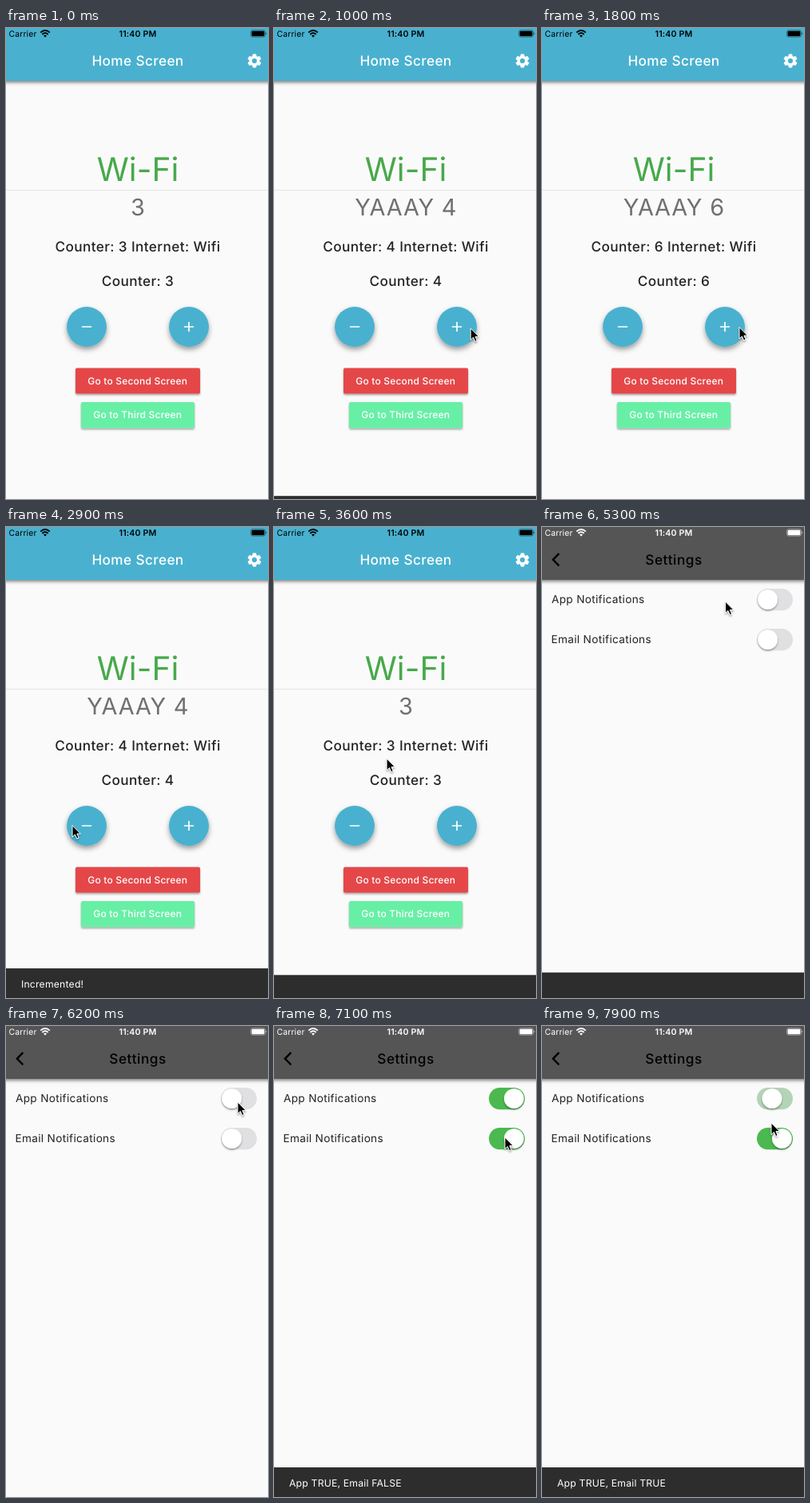
Write an HTML page that moves like this. It is 328 px wide and 588 px high and loops after 8 s.

```html
<!DOCTYPE html>
<html lang="en">
<head>
<meta charset="utf-8">
<title>Counter app</title>
<style>
  html, body { margin: 0; width: 100%; height: 100%; overflow: hidden; background: #fafafa; }
  svg { display: block; width: 100vw; height: 100vh; }
  text { font-family: Inter, Roboto, sans-serif; text-rendering: geometricPrecision; }
  .mid { text-anchor: middle; }
  .title { font-size: 17.2px; font-weight: 500; letter-spacing: .38px; }
  .button { font-size: 12px; font-weight: 500; letter-spacing: .2px; fill: #fff; }
  .tile { font-size: 13.6px; letter-spacing: .33px; fill: #222; }
  .snack { font-size: 12.2px; letter-spacing: .2px; fill: #fff; }
  .status { font-size: 10.4px; letter-spacing: .15px; }
</style>
</head>
<body>
<svg viewBox="0 0 328 588">
  <defs>
    <filter id="shade" x="-20%" y="-20%" width="140%" height="160%">
      <feDropShadow dx="0" dy="1.6" stdDeviation="1.3" flood-opacity=".38"/>
    </filter>
    <filter id="lift" x="-30%" y="-30%" width="160%" height="170%">
      <feDropShadow dx="0" dy="3.5" stdDeviation="3" flood-opacity=".38"/>
    </filter>
    <filter id="barShade" x="-5%" y="-10%" width="110%" height="140%">
      <feDropShadow dx="0" dy="2" stdDeviation="2" flood-opacity=".5"/>
    </filter>
    <linearGradient id="edge">
      <stop offset="0" stop-opacity="0"/>
      <stop offset="1" stop-opacity=".14"/>
    </linearGradient>
  </defs>

  <g id="home">
    <rect width="328" height="588" fill="#fafafa"/>
    <rect y="202" width="328" height="1" fill="#e5e5e5"/>
    <rect x="-6" y="-10" width="340" height="76" fill="#49b1cf" filter="url(#barShade)"/>
    <text class="title mid" x="165" y="47" fill="#fff">Home Screen</text>
    <g id="gear" transform="translate(311 41)" fill="#fff"></g>
    <text class="mid" x="165" y="191" font-size="40.7" fill="#47a94b">Wi-Fi</text>
    <text id="mood" class="mid" x="165.3" y="233.5" font-size="28.9" letter-spacing=".8" fill="#707070"></text>
    <text id="summary" class="title mid" x="165" y="279" fill="#222"></text>
    <text id="counter" class="title mid" x="165" y="322" fill="#222"></text>
    <g fill="#49b1cf" filter="url(#lift)">
      <circle cx="101" cy="373" r="25"/>
      <circle cx="229" cy="373" r="25"/>
    </g>
    <path d="M94.9 373h12.2M222.9 373h12.2M229 366.9v12.2" stroke="#fff" stroke-width="1.7"/>
    <rect x="87" y="424.5" width="156" height="32" rx="1.8" fill="#e54748" filter="url(#shade)"/>
    <rect x="94" y="467" width="142" height="32.5" rx="1.8" fill="#67efa6" filter="url(#shade)"/>
    <text class="button mid" x="164.7" y="444.5">Go to Second Screen</text>
    <text class="button mid" x="164.7" y="487">Go to Third Screen</text>
  </g>

  <g id="settings">
    <rect x="-14" width="14" height="588" fill="url(#edge)"/>
    <rect width="328" height="588" fill="#fafafa"/>
    <svg width="328" height="90">
      <rect x="-6" y="-10" width="340" height="76" fill="#545454" filter="url(#barShade)"/>
    </svg>
    <path d="M21.3 33.2L13.8 40.8L21.3 48.4" fill="none" stroke="#000" stroke-width="2.4"/>
    <text class="title mid" x="165" y="47" style="letter-spacing:.5px">Settings</text>
    <text class="tile" x="12" y="95.3">App Notifications</text>
    <text class="tile" x="11.5" y="145.3">Email Notifications</text>
    <g id="appSwitch" transform="translate(269 77)"></g>
    <g id="mailSwitch" transform="translate(269 127)"></g>
  </g>

  <g id="snack">
    <rect width="328" height="38" fill="#2d2d2d"/>
    <text id="snackText" class="snack" x="19" y="24.3"></text>
  </g>

  <g id="status">
    <text class="status" x="3.5" y="11">Carrier</text>
    <g fill="none" stroke="currentColor" stroke-width="1.9">
      <path d="M43.2 5.6Q49 .4 54.8 5.6M45.3 8Q49 4.7 52.7 8"/>
      <path d="M49 11.8L47 9.6Q49 8 51 9.6Z" fill="currentColor" stroke="none"/>
    </g>
    <text class="status mid" x="165" y="11" font-weight="600" style="font-size:10.6px">11:40 PM</text>
    <rect x="306.5" y="2.8" width="18" height="8.4" rx="2.2" fill="none" stroke="currentColor" stroke-opacity=".5" stroke-width=".8"/>
    <rect x="307.6" y="3.8" width="15.8" height="6.4" rx="1.3" fill="currentColor"/>
    <path d="M325.6 5.5q1.5 1.5 0 3z" fill="currentColor"/>
  </g>

  <path id="cursor" d="M0 0V14.6L3.4 11.4L5.7 16.6L8.1 15.6L5.9 10.5H10.4Z" fill="#000" stroke="#fff" stroke-width="1" stroke-linejoin="round" filter="url(#shade)"/>
</svg>
<script>
const LOOP = 8000, STEP = 100;
const $ = id => document.getElementById(id);
const clamp = v => Math.min(1, Math.max(0, v));
const mix = (a, b, p) => a + (b - a) * p;
const smooth = p => p * p * (3 - 2 * p);
const move = (id, x, y) => $(id).setAttribute('transform', `translate(${x} ${y})`);

function bezier(x1, y1, x2, y2) {
  const at = (a, b, s) => 3 * a * s * (1 - s) ** 2 + 3 * b * s * s * (1 - s) + s ** 3;
  return x => {
    let lo = 0, hi = 1;
    for (let i = 0; i < 22; i++) {
      const s = (lo + hi) / 2;
      if (at(x1, x2, s) < x) lo = s; else hi = s;
    }
    return at(y1, y2, (lo + hi) / 2);
  };
}
const slideEase = bezier(.35, .91, .33, .97);
const barEase = bezier(.4, 0, .2, 1);

// time, x, y of the pointer tip
const pointer = [
  [0, 336, 472], [800, 246, 375], [1700, 247, 373.5], [1800, 247, 373.5], [2400, 84, 373],
  [2900, 83, 372.5], [3300, 83, 372.5], [4200, 307, 51], [4600, 307, 51], [5300, 229.5, 93],
  [5400, 229.5, 93], [6000, 290, 95], [6550, 290, 95], [6800, 289, 139], [7250, 289, 139],
  [7650, 287, 98], [7750, 287, 98], [7900, 287, 121], [8000, 287, 128]
];
const presses = [[955, 1], [1250, 1], [1550, 1], [2450, -1], [2750, -1], [3150, -1]];
const snacks = [
  ...[0, 1, 2, 3, 4, 5].map(i => [955 + 840 * i, i < 3 ? 'Incremented!' : 'Decremented!']),
  [6530, 'App TRUE, Email FALSE'], [7370, 'App TRUE, Email TRUE']
];
const SNACK_FADE = 250, SNACK_LIFE = 840, OPEN_AT = 4550;

$('gear').innerHTML = '<circle r="6.3"/>' +
  [0, 60, 120].map(a => `<path d="M-2 -8.6H2L3 -5V5L2 8.6H-2L-3 5V-5Z" transform="rotate(${a})"/>`).join('') +
  '<circle r="3.1" fill="#49b1cf"/>';
for (const id of ['appSwitch', 'mailSwitch']) {
  $(id).innerHTML = '<rect width="45" height="27.2" rx="13.6"/>' +
    '<circle cy="13.6" r="12.4" fill="#fff" filter="url(#shade)"/>';
}

function drawSwitch(id, on) {
  const [track, knob] = $(id).children;
  const channels = [[224, 75], [224, 185], [226, 79]].map(([a, b]) => Math.round(mix(a, b, on)));
  track.setAttribute('fill', `rgb(${channels})`);
  knob.setAttribute('cx', mix(13.6, 31.4, on));
}

function drawCounter(t) {
  const n = presses.reduce((sum, [at, d]) => sum + (t >= at ? d : 0), 3);
  $('mood').textContent = n === 5 ? 'HMM, NUMBER 5' : n % 2 ? n : `YAAAY ${n}`;
  $('summary').textContent = `Counter: ${n} Internet: Wifi`;
  $('counter').textContent = `Counter: ${n}`;
}

function drawSnack(t) {
  const snack = snacks.find(([at]) => t >= at && t < at + SNACK_LIFE);
  const age = snack ? t - snack[0] : 0;
  const v = clamp(Math.min(age, SNACK_LIFE - age) / SNACK_FADE);
  move('snack', 0, 588 - 37 * barEase(v));
  $('snack').style.display = snack && v > .08 ? '' : 'none';
  $('snackText').textContent = snack ? snack[1] : '';
  $('snackText').setAttribute('opacity', clamp((v - .58) / .42));
}

function drawPointer(t) {
  const i = Math.max(1, pointer.findIndex(k => k[0] >= t));
  const [a, b] = [pointer[i - 1], pointer[i]];
  const p = smooth(clamp((t - a[0]) / (b[0] - a[0])));
  move('cursor', mix(a[1], b[1], p), mix(a[2], b[2], p));
  $('cursor').style.display = t < 100 ? 'none' : '';
}

function draw(t) {
  const open = clamp((t - OPEN_AT) / 400), slide = open && slideEase(open);
  move('home', -328 / 3 * slide, 0);
  move('settings', 328 * (1 - slide), 0);
  $('settings').style.display = open ? '' : 'none';
  const ink = slide > .5 ? '#fff' : '#000';
  $('status').style.color = $('status').style.fill = ink;
  drawCounter(t);
  drawSwitch('appSwitch', clamp((t - 6530) / 200) - clamp((t - 7760) / 200));
  drawSwitch('mailSwitch', clamp((t - 6850) / 200));
  drawSnack(t);
  drawPointer(t);
}

const start = performance.now();
function tick() {
  const t = (performance.now() - start) % LOOP;
  draw(Math.floor(t / STEP) * STEP);
  requestAnimationFrame(tick);
}
tick();
</script>
</body>
</html>
```
